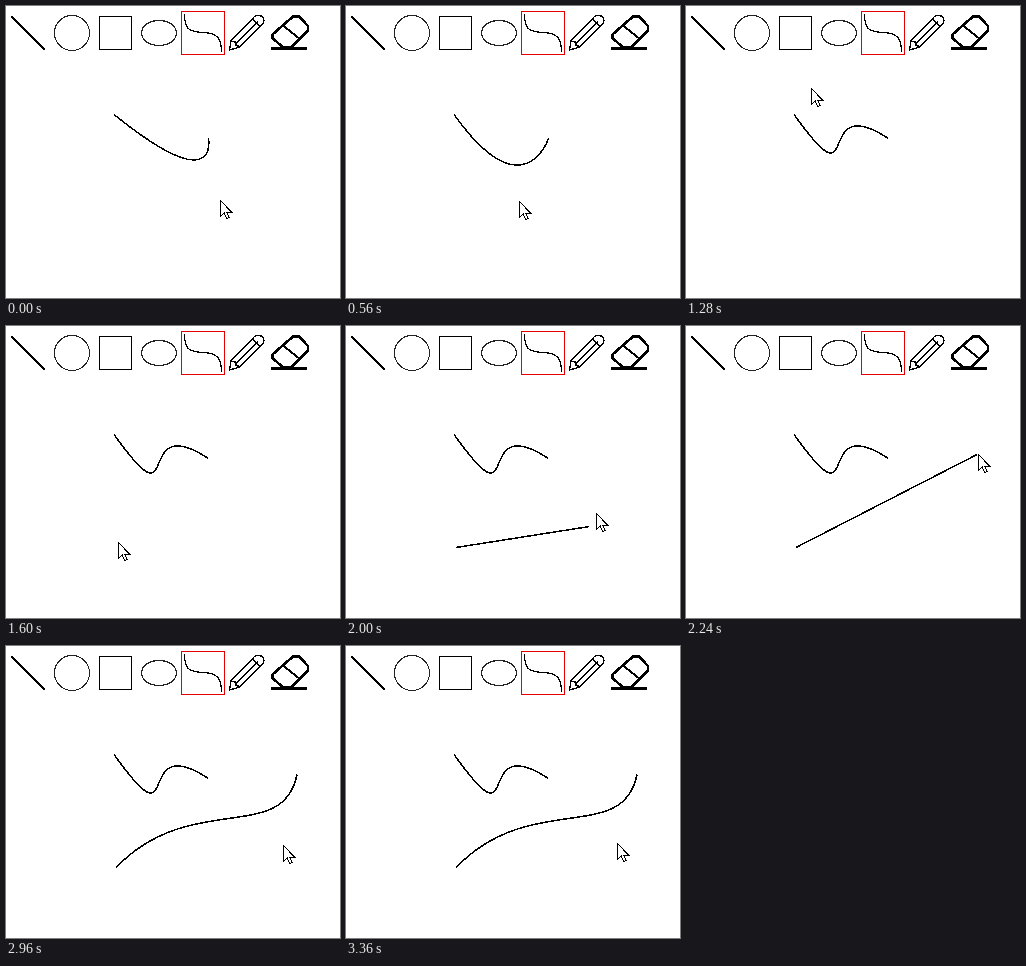
These frames come from a looping animation (334 px wide and 292 px high, 3440 ms). An HTML page:

```html
<!DOCTYPE html>
<html lang="en">
<head>
<meta charset="utf-8">
<title>Curve tool</title>
<style>
  html, body { margin: 0; width: 100%; height: 100%; overflow: hidden; background: #fff; }
  svg { display: block; width: 334px; height: 292px; shape-rendering: crispEdges; }
</style>
</head>
<body>
<svg viewBox="0 0 334 292" fill="none" stroke="#000">
  <g id="toolbar">
    <path d="M5.5 10.5L39 44" stroke-width="1.6"/>
    <circle cx="66" cy="27" r="17.5" stroke="#222" stroke-width="1.2"/>
    <rect x="93.5" y="10.5" width="32" height="33"/>
    <ellipse cx="153" cy="27" rx="17.5" ry="12.5" stroke="#222" stroke-width="1.3"/>
    <rect x="175.5" y="5.500" width="43" height="43" stroke="#e60000"/>
    <path d="M178.500 8C178.500 22 182 26 197 26.500C211 27 215.500 32 215.500 46" stroke-width="1.300"/>
    <g id="pencil" stroke-width="1.400">
      <path d="M223.500 44L225 35L248 11Q251 8 255 10Q259 12 257.500 17L234 41Z"/>
      <path d="M225 35L229 36L230 39L234 41M229.500 38L252 15M246 13L254 20"/>
    </g>
    <g id="eraser" stroke-width="2.600">
      <path d="M287 10.500H293L302 20V24.500L285 41.500H277L266.500 32V28.500Z"/>
      <path d="M277 19.500L294 33" stroke-width="2"/>
      <path d="M265 42.500H301" stroke-width="3"/>
    </g>
  </g>
  <path id="wave" stroke-width="1.500"/>
  <path id="sweep" stroke-width="1.500"/>
  <path id="cursor" d="M.5 .5V16.500L4.300 13L6.700 18.500L9 17.500L6.700 12H11.500Z" fill="#fff"/>
</svg>
<script>
const STEP = 80, LOOP = 3440;
const byId = id => document.getElementById(id);
const ease = k => k * k * (3 - 2 * k);
const clamp = (v, low, high) => Math.min(Math.max(v, low), high);

// A path rests at each point until its next eased move begins.
function makePath(start, ...moves) {
  return time => moves.reduce((from, { begin, end, to }) => {
    const k = ease(clamp((time - begin) / (end - begin), 0, 1));
    return from.map((v, i) => v + (to[i] - v) * k);
  }, start);
}
const move = (begin, end, x, y) => ({ begin, end, to: [x, y] });

const pointer = makePath([214, 194],
  move(0, 320, 178, 206),
  move(480, 880, 128, 104),
  move(1040, 1280, 125, 82),
  move(1360, 1600, 112, 216),
  move(1600, 2000, 250, 187),
  move(2000, 2240, 292, 128),
  move(2240, 2480, 185, 144),
  move(2640, 2960, 277, 199),
  move(3280, 3360, 271, 197));

const sweepStart = [110, 221.5];
const sweepEnd = makePath(sweepStart,
  move(1680, 2000, 243.5, 200.5),
  move(2000, 2240, 291, 128.5));

const pulled = (time, from, to) => pointer(clamp(time, from, to));

function drawCurve(id, start, first, second, end) {
  byId(id).setAttribute("d", `M${start}C${first} ${second} ${end}`);
}

function drawWave(time) {
  const end = [202.5, 132.5];
  const second = time < 640 ? end : pulled(time, 640, 1280);
  drawCurve("wave", [108, 108.5], pulled(time, 0, 320), second, end);
}

function drawSweep(time) {
  const end = sweepEnd(time);
  const first = time < 2480 ? sweepStart : pulled(time, 2480, 2560);
  const second = time < 2800 ? end : pulled(time, 2800, 3120);
  byId("sweep").style.display = time < 1760 ? "none" : "";
  drawCurve("sweep", sweepStart, first, second, end);
}

function render(elapsed) {
  const time = Math.floor((elapsed % LOOP) / STEP) * STEP;
  drawWave(time);
  drawSweep(time);
  byId("cursor").setAttribute("transform", `translate(${pointer(time).map(Math.round)})`);
}

const origin = performance.now();
function tick() {
  render(performance.now() - origin);
  requestAnimationFrame(tick);
}
tick();
</script>
</body>
</html>
```
